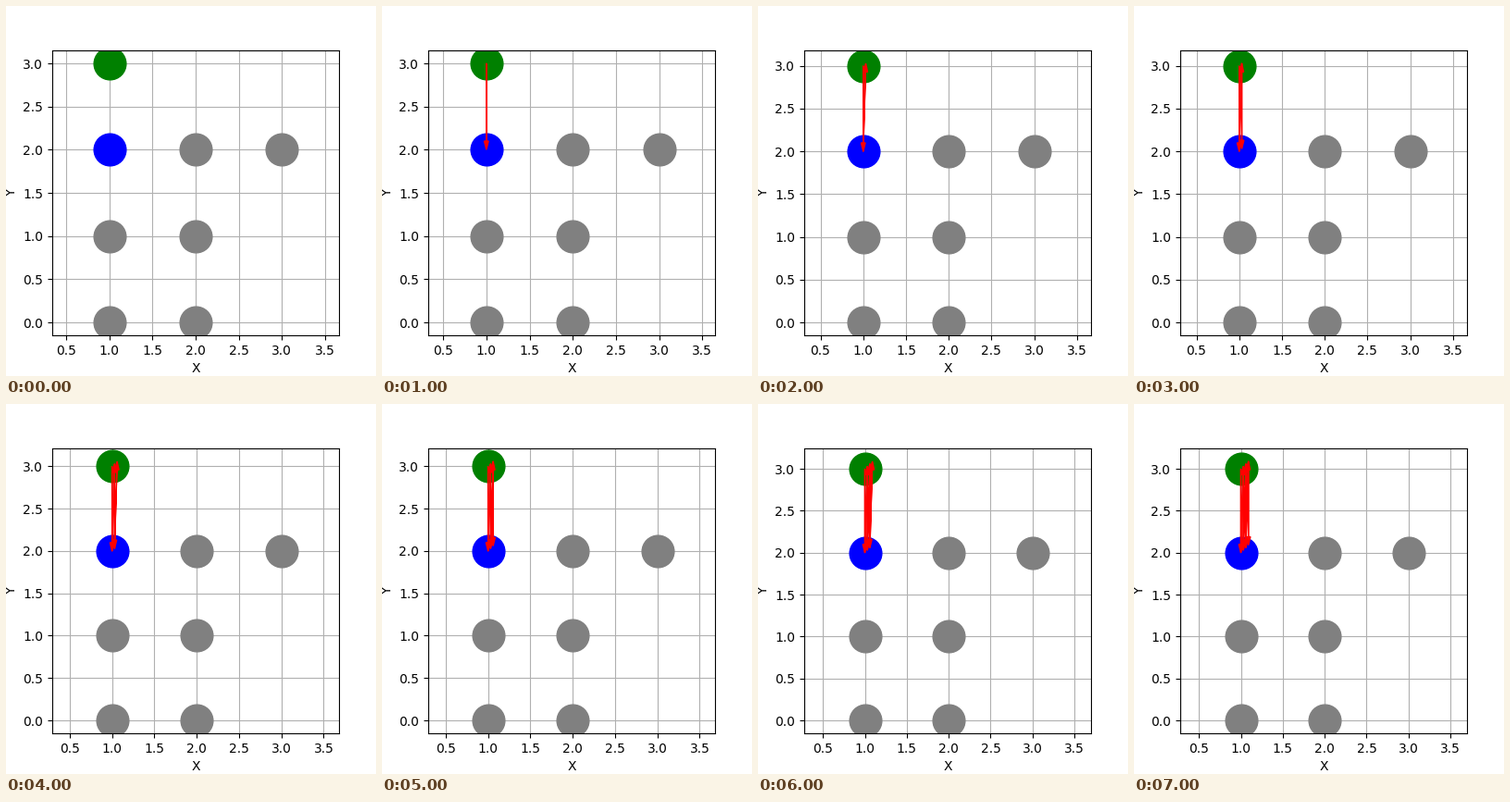
Recreate the animation shown at these times as a matplotlib script. Size 400 by 400 pixels, loop 8 s.

```python
import matplotlib.pyplot as plt
from matplotlib.animation import FuncAnimation

STEPS = 8
DRIFT = 0.03  # shift added on every return to a node
START, GOAL = (1, 3), (1, 2)
NODES = [(1, 0), (1, 1), (2, 0), (2, 1), (2, 2), (3, 2)]

fig, ax = plt.subplots(figsize=(4, 4), dpi=100)


def dots(points, color):
    xs, ys = zip(*points)
    ax.plot(xs, ys, "o", color=color, markersize=25, zorder=2)


def stop(k):
    """Position after k moves between the two end nodes."""
    x, y = (START, GOAL)[k % 2]
    shift = DRIFT * (k // 2)
    return x + shift, y + shift


def move(k):
    (x0, y0), (x1, y1) = stop(k - 1), stop(k)
    ax.arrow(x0, y0, x1 - x0, y1 - y0, color="red", head_width=0.05,
             head_length=0.1, length_includes_head=True, zorder=3)


def draw(step):
    ax.clear()
    dots(NODES, "gray")
    dots([START], "green")
    dots([GOAL], "blue")
    for k in range(1, step + 1):
        move(k)
    ax.set_xlabel("X")
    ax.set_ylabel("Y")
    ax.grid(True)
    ax.axis("equal")
    return []


anim = FuncAnimation(fig, draw, frames=STEPS, init_func=lambda: draw(0),
                     interval=1000, repeat=True, repeat_delay=0)
plt.show()
```
